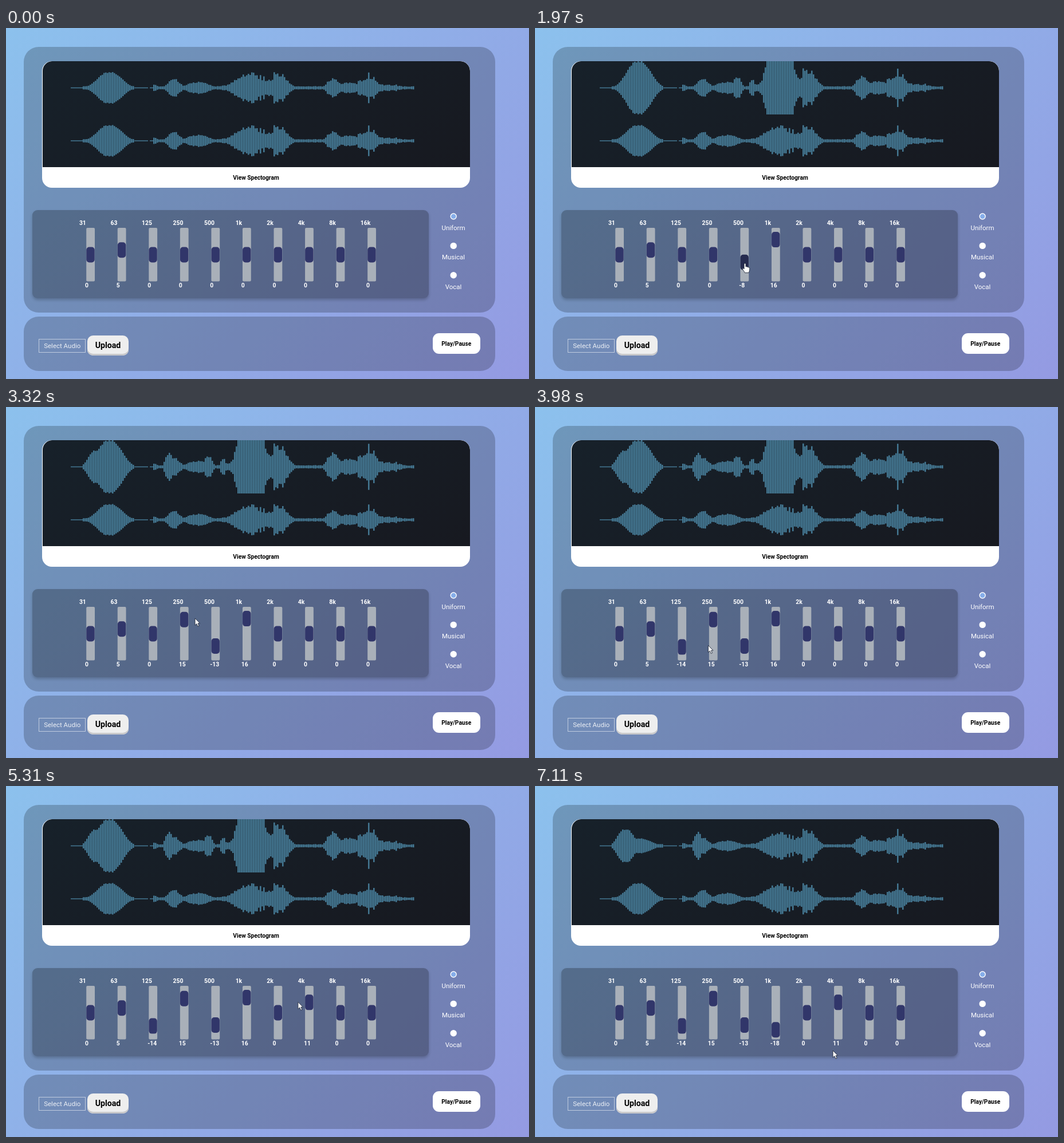
An HTML page that plays this animation: 913 by 613 pixels, repeating every 7.16 s.

```html
<!DOCTYPE html>
<html lang="en">
<head>
<meta charset="utf-8">
<title>Equalizer</title>
<style>
html, body { margin: 0; width: 100%; height: 100%; overflow: hidden; }
body { position: relative; background: linear-gradient(135deg, #8cc1ed, #949ae2); }
div, svg { position: absolute; box-sizing: border-box; }
svg { left: 0; top: 0; }
.panel { left: 31px; width: 823px; background: rgba(0, 0, 0, .21); border-radius: 26px; }
#main { top: 33px; height: 464px; }
#footer { top: 504px; height: 95px; }
#card { left: 63px; top: 58px; width: 747px; height: 221px; border-radius: 17px; background: #fff; overflow: hidden; }
#screen { left: 1px; top: 0; right: 0; height: 185px; border-radius: 17px 17px 0 0; background: linear-gradient(150deg, #17212a, #171920); }
#mixer { left: 46px; top: 318px; width: 692px; height: 154px; border-radius: 9px; background: rgba(0, 0, 0, .25); box-shadow: 0 3px 5px rgba(0, 0, 0, .2); }
#select { left: 57px; top: 543px; width: 82px; height: 24px; border: 1px solid rgba(255, 255, 255, .55); }
#upload { left: 142px; top: 537px; width: 72px; height: 35px; border-radius: 10px; background: #eee; box-shadow: inset 0 -3px #c9c9cb; }
#play { left: 745px; top: 533px; width: 83px; height: 36px; border-radius: 11px; background: #fff; }
text { font-family: Roboto, Arial, sans-serif; }
.mid { text-anchor: middle; }
.bold { font-size: 10.2px; font-weight: 700; }
.band { font-size: 10.4px; font-weight: 600; fill: #fff; }
.light { font-size: 11.5px; font-weight: 400; fill: #fff; }
</style>
</head>
<body>
<div class="panel" id="main"></div>
<div class="panel" id="footer"></div>
<div id="card"><div id="screen"></div></div>
<div id="mixer"></div>
<div id="select"></div>
<div id="upload"></div>
<div id="play"></div>
<svg width="913" height="613" viewBox="0 0 913 613">
  <clipPath id="clip"><rect x="64" y="58" width="746" height="93"/></clipPath>
  <g fill="#447893">
    <path id="top" clip-path="url(#clip)"/>
    <path id="bottom"/>
  </g>
  <text class="bold mid" x="436.5" y="265">View Spectogram</text>
  <text class="bold mid" x="786.3" y="554.7">Play/Pause</text>
  <text class="mid" x="178" y="559" font-size="14.2" font-weight="700">Upload</text>
  <text class="light mid" x="98.2" y="559" opacity=".85">Select Audio</text>
  <g id="bands"></g>
  <g id="modes"></g>
  <g id="cursor" fill="#fff" stroke="#222a3c" stroke-width=".9">
    <path id="arrow" d="M0 0V12.2L2.8 9.6L4.9 14.2L7 13.3L5 8.8H8.6Z"/>
    <path id="hand" d="M-1.5 1Q0 -1.2 1.5 1V6Q3 4.8 4 6.5Q5.6 5.4 6.3 7.2Q8 6.6 8.2 8.5V11Q8 14 6.4 16.5H-.3Q-1.5 13.5 -4 10.5Q-4.6 8 -2.6 8.7L-1.5 10Z"/>
  </g>
</svg>
<script>
const LOOP = 7160, HOLD = 120, LOAD = 200;
const $ = id => document.getElementById(id);
const bandX = i => 147.5 + i * 54.55;
const knobY = value => 396 - value * 1.65;

function add(parent, tag, attrs, text = '') {
  const el = document.createElementNS('http://www.w3.org/2000/svg', tag);
  for (const k in attrs) el.setAttribute(k, attrs[k]);
  el.textContent = text;
  return parent.appendChild(el);
}

// Sound as bell-shaped bursts: [centre, width, height] per group
const bursts = {
  voice: [[180, 28, 28]],
  low: [[157, 18, 30], [283, 8, 27]],
  mid: [[352, 9, 20], [378, 6, 15]],
  peak: [[427, 22, 200]],
  high: [[472, 22, 28], [570, 13, 18], [598, 22, 10], [630, 18, 27], [660, 32, 8]],
  rest: [[258, 6, 6], [292, 14, 16], [334, 24, 11], [428, 36, 27]]
};

// How loud each group is for a mix
const mixes = {
  plain: { voice: 1, low: 0, mid: .3, peak: 0, high: 1, rest: 1 },
  boosted: { voice: 1.7, low: 0, mid: 1, peak: 1, high: 1.25, rest: 1 },
  full: { voice: 1.7, low: 1, mid: 1, peak: 1, high: 1.5, rest: 1 },
  cut: { voice: .47, low: 1, mid: .3, peak: 0, high: 1.1, rest: .9 }
};

const random = n => Math.abs(Math.sin(n * 12.9898) * 43758.5453) % 1;

function height(x, mix) {
  if (x < 132 || (x > 222 && x < 256)) return .7;
  let h = 3;
  for (const group in bursts)
    for (const [c, w, a] of bursts[group])
      h = Math.max(h, mix[group] * a * Math.exp(-((Math.abs(x - c) / w) ** 2.5)));
  const rough = (x > 437 && x < 492) || x > 616 ? .5 : x > 256 ? .25 : .08;
  return h * (1 - rough * random(x));
}

function wavePath(mix, mid) {
  let d = '';
  for (let x = 113; x < 713; x += 3) {
    if (x === 248) continue;
    const h = height(x, mix);
    const w = h < 1 ? 3 : 2.5;
    d += `M${x} ${mid - h}h${w}v${2 * h}h${-w}z`;
  }
  return d;
}

$('bottom').setAttribute('d', wavePath(mixes.plain, 197));
const waves = { '': '' };
for (const name in mixes) waves[name] = wavePath(mixes[name], 104.5);

// One row per drag; the named mix loads after release
const drags = [
  [5, 960, 1280, 0, 16, 'boosted'],
  [4, 1760, 2110, 0, -13, 'boosted'],
  [3, 2560, 2850, 0, 15, 'full'],
  [2, 3460, 3660, 0, -14, 'full'],
  [7, 4560, 4940, 0, 11, 'full'],
  [5, 5970, 6090, 16, -10, ''],
  [5, 6330, 6430, -10, -18, 'cut']
].map(([band, start, end, from, to, mix]) => ({ band, start, end, from, to, mix }));

// Cursor stops: the drags plus where it enters, pauses and leaves
const stops = [
  [70, 856, 598], [780, 434, 376], [3320, 330, 369], [7110, 520, 462],
  ...drags.flatMap(d => {
    const x = bandX(d.band) + .8, y = knobY(d.to) + 1;
    return [[d.start, x, knobY(d.from) + 1], [d.end, x, y], [d.end + HOLD, x, y]];
  })
].sort((a, b) => a[0] - b[0]);

const progress = (t, a, b) => Math.min(1, Math.max(0, (t - a) / (b - a)));

function cursorAt(t) {
  const n = stops.findIndex(s => s[0] > t);
  if (n < 1) return (n ? stops[stops.length - 1] : stops[0]).slice(1);
  const [t0, x0, y0] = stops[n - 1], [t1, x1, y1] = stops[n];
  const p = progress(t, t0, t1);
  const e = p * p * (3 - 2 * p);
  return [x0 + (x1 - x0) * e, y0 + (y1 - y0) * e];
}

function valueAt(band, t) {
  let value = band === 1 ? 5 : 0;
  for (const d of drags)
    if (d.band === band && t >= d.start) {
      const p = progress(t, d.start, d.end);
      value = d.from + (d.to - d.from) * p * p * (3 - 2 * p);
    }
  return Math.round(value);
}

function mixAt(t) {
  const last = drags.filter(d => t >= d.end + HOLD).pop();
  if (!last) return 'plain';
  return t < last.end + HOLD + LOAD ? '' : last.mix;
}

const bands = ['31', '63', '125', '250', '500', '1k', '2k', '4k', '8k', '16k'].map((name, i) => {
  const g = $('bands'), x = bandX(i);
  add(g, 'text', { class: 'band', x: x - 19.6, y: 344.3 }, name);
  add(g, 'rect', { x: x - 7.3, y: 349, width: 14.8, height: 93.5, rx: 2, fill: '#a9b0b9' });
  return {
    x,
    knob: add(g, 'rect', { x: x - 7.2, width: 14.4, height: 27, rx: 5 }),
    label: add(g, 'text', { class: 'band', x: x - 9.4, y: 452.5 })
  };
});

['Uniform', 'Musical', 'Vocal'].forEach((name, i) => {
  const g = $('modes'), y = 329 + i * 51.4;
  add(g, 'circle', { cx: 781.2, cy: y, r: 5, fill: i ? '#fff' : '#86aeea', stroke: '#fff', 'stroke-width': 1.4 });
  add(g, 'text', { class: 'light mid', x: 781, y: y + 23.7 }, name);
});

let current;
function draw(t) {
  const mix = mixAt(t);
  if (mix !== current) $('top').setAttribute('d', waves[current = mix]);

  const [x, y] = cursorAt(t);
  let over = false;
  bands.forEach((b, i) => {
    const value = valueAt(i, t);
    const mid = knobY(value);
    const hot = Math.abs(x - b.x) < 8 && Math.abs(y - mid) < 14;
    over = over || hot;
    b.knob.setAttribute('y', mid - 13.5);
    b.knob.setAttribute('fill', hot ? '#262b4f' : '#31366a');
    b.label.textContent = value;
  });
  $('cursor').setAttribute('transform', `translate(${x} ${y})`);
  $('cursor').style.display = t < 70 ? 'none' : '';
  $('arrow').style.display = over ? 'none' : '';
  $('hand').style.display = over ? '' : 'none';
}

const start = performance.now();
function tick() {
  draw((performance.now() - start) % LOOP);
  requestAnimationFrame(tick);
}
tick();
</script>
</body>
</html>
```
